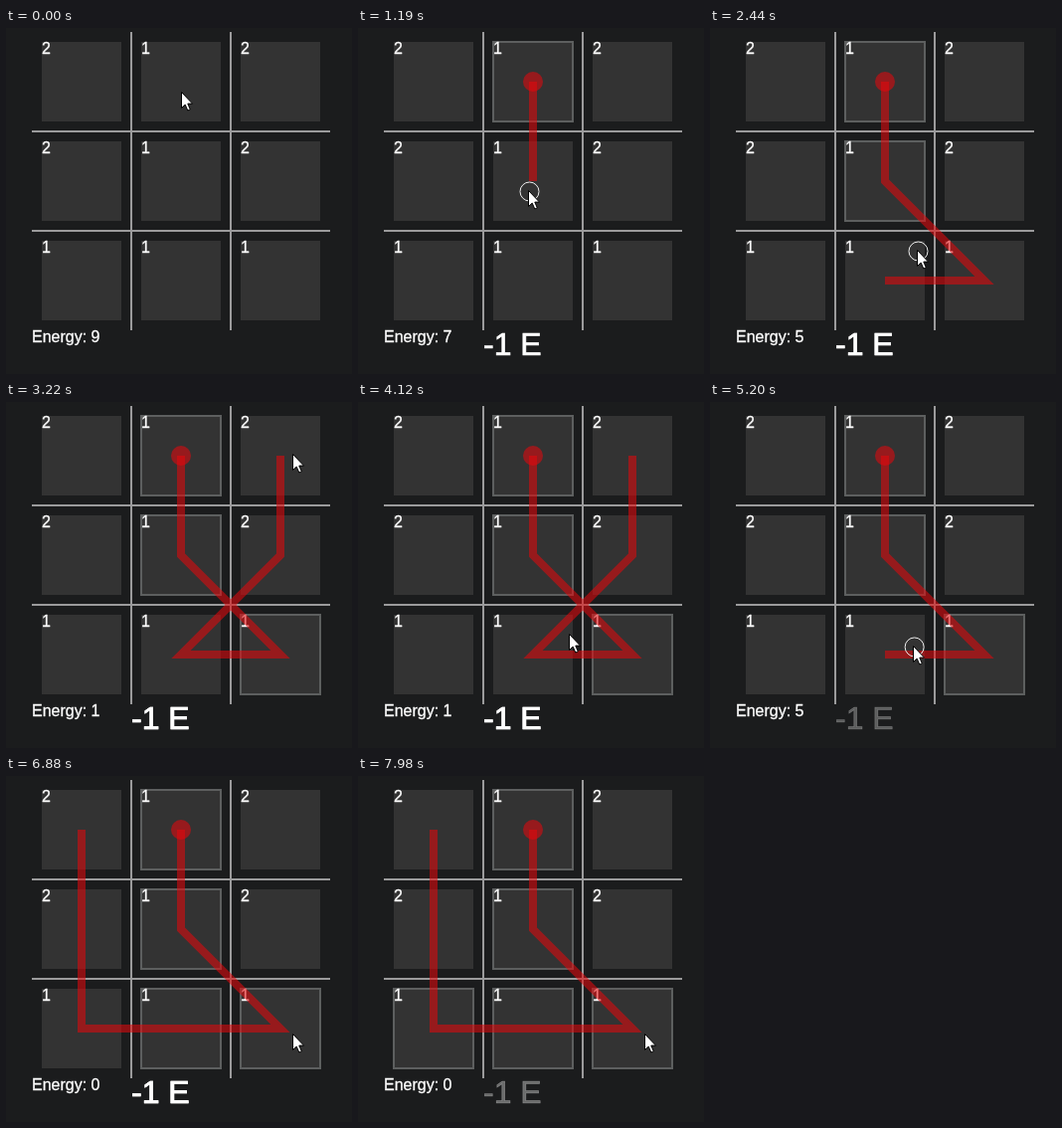
Write an HTML page with a canvas that moves like this. It is 348x348 px and loops after 8000 ms.

```html
<!DOCTYPE html>
<html lang="en">
<head>
<meta charset="utf-8">
<title>Energy path</title>
<style>
  html, body { margin: 0; width: 100%; height: 100%; overflow: hidden; background: #1b1c1d; }
  canvas { display: block; }
</style>
</head>
<body>
<canvas id="stage" width="348" height="348"></canvas>
<script>
const ctx = document.getElementById('stage').getContext('2d');
const LOOP = 8000;
const START_ENERGY = 9;
const STEP = 100;
const BOARD = { x: 26, y: 4, size: 3 * STEP };
const FONT = '"Liberation Sans", Arial, sans-serif';

const TURN = 1024;            // time the walker needs per cell
const FIRST_TURN = 910;
const RIPPLE_TIME = 150;
const CLICK_PAUSE = 300;      // a popup needs this much quiet after its click
const MS_PER_PIXEL = 2.4;     // pointer speed
const POPUP = { fadeIn: 300, fadeOutAt: 1580, fadeOut: 800 };

// Pointer stops; all but the idle ones are clicks.
const stop = (time, x, y, idle = false) => ({ time, x, y, idle });
const STOPS = [
  stop(470, 177, 65), stop(1150, 172, 164), stop(2140, 286, 250), stop(2400, 209, 224),
  stop(3050, 289, 53), stop(4100, 213, 234, true), stop(5150, 206, 246),
  stop(5550, 54, 240), stop(5880, 90, 82), stop(6870, 289, 260, true)
];

const clamp = v => Math.max(0, Math.min(1, v));
const center = ({ col, row }) => [76 + STEP * col, 54 + STEP * row];
const corner = ({ col, row }) => [36 + STEP * col, 14 + STEP * row];
const cost = ({ col, row }) => row < 2 && col !== 1 ? 2 : 1;
const cellAt = ({ x, y }) => ({
  col: Math.floor((x - BOARD.x) / STEP),
  row: Math.floor((y - BOARD.y) / STEP)
});
const sameCell = (a, b) => a.col === b.col && a.row === b.row;
const CELLS = Array.from({ length: 9 }, (_, i) => ({ col: i % 3, row: Math.floor(i / 3) }));

// A visited cell cuts the path back; a new one is reached king-wise.
function extend(path, target) {
  const visited = path.findIndex(cell => sameCell(cell, target));
  if (visited >= 0) return path.slice(0, visited + 1);
  if (!path.length) return [target];
  const { col, row } = path[path.length - 1];
  const next = {
    col: col + Math.sign(target.col - col),
    row: row + Math.sign(target.row - row)
  };
  const longer = [...path, next];
  return sameCell(next, target) ? longer : extend(longer, target);
}

let route = [];
const clicks = STOPS.filter(s => !s.idle).map(({ time, x, y }, i, all) => {
  const before = route.length;
  route = extend(route, cellAt({ x, y }));
  const quiet = i + 1 === all.length || all[i + 1].time - time > CLICK_PAUSE;
  return { time, path: route, popup: quiet && route.length > before };
});

// The detour after the third cell costs two turns.
const outlineTime = index => FIRST_TURN + TURN * (index + (index > 2 ? 2 : 0));

function pathAt(time) {
  const last = clicks.filter(click => click.time <= time).pop();
  return last ? last.path : [];
}

function pointerAt(time) {
  const next = STOPS.findIndex(s => s.time > time);
  if (next < 0) return STOPS[STOPS.length - 1];
  if (next === 0) return STOPS[0];
  const from = STOPS[next - 1], to = STOPS[next];
  const travel = Math.min(to.time - from.time,
    MS_PER_PIXEL * Math.hypot(to.x - from.x, to.y - from.y));
  const p = clamp(1 - (to.time - time) / travel);
  const eased = p * p * (3 - 2 * p);
  return { x: from.x + (to.x - from.x) * eased, y: from.y + (to.y - from.y) * eased };
}

function text(str, x, y, size) {
  ctx.font = `${size}px ${FONT}`;
  ctx.fillStyle = ctx.strokeStyle = '#fff';
  ctx.lineWidth = size / 50;
  ctx.fillText(str, x, y);
  ctx.strokeText(str, x, y);
}

function drawBoard(time) {
  ctx.fillStyle = '#1b1c1d';
  ctx.fillRect(0, 0, 348, 348);

  ctx.fillStyle = '#9b9b9c';
  for (const offset of [STEP, 2 * STEP]) {
    ctx.fillRect(BOARD.x + offset - 1, BOARD.y, 2, BOARD.size);
    ctx.fillRect(BOARD.x, BOARD.y + offset - 1, BOARD.size, 2);
  }

  ctx.fillStyle = '#333';
  for (const cell of CELLS) ctx.fillRect(...corner(cell), 80, 80);

  ctx.strokeStyle = '#5d5f5f';
  ctx.lineWidth = 2;
  route.forEach((cell, index) => {
    if (time >= outlineTime(index)) ctx.strokeRect(...corner(cell), 80, 80);
  });

  for (const cell of CELLS) {
    const [x, y] = corner(cell);
    text(cost(cell), x, y + 12, 16);
  }
}

function drawPath(path) {
  if (!path.length) return;
  ctx.fillStyle = ctx.strokeStyle = 'rgba(230, 8, 12, 0.56)';
  ctx.beginPath();
  ctx.arc(...center(path[0]), 10, 0, 2 * Math.PI);
  ctx.fill();

  ctx.lineWidth = 8;
  ctx.beginPath();
  path.forEach(cell => ctx.lineTo(...center(cell)));
  ctx.stroke();
}

function drawPopups(time) {
  for (const click of clicks) {
    const age = time - click.time;
    if (!click.popup || age < 0) continue;
    ctx.globalAlpha = Math.min(
      clamp(age / POPUP.fadeIn),
      clamp(1 - (age - POPUP.fadeOutAt) / POPUP.fadeOut));
    text('-1 E', 126, 329, 32);
  }
  ctx.globalAlpha = 1;
}

function drawPointer(time) {
  const { x, y } = pointerAt(time);
  if (clicks.some(click => time >= click.time && time < click.time + RIPPLE_TIME)) {
    ctx.strokeStyle = '#eee';
    ctx.lineWidth = 1;
    ctx.beginPath();
    ctx.arc(x + 0.5, y + 0.5, 9.5, 0, 2 * Math.PI);
    ctx.stroke();
  }

  ctx.save();
  ctx.translate(Math.round(x) - 0.5, Math.round(y) - 0.5);
  const arrow = new Path2D('M0 0V16L3.7 12.6 6.3 18.5 8.8 17.4 6.3 11.6H11Z');
  ctx.fillStyle = '#fff';
  ctx.fill(arrow);
  ctx.strokeStyle = '#000';
  ctx.lineWidth = 1;
  ctx.stroke(arrow);
  ctx.restore();
}

function render(time) {
  const path = pathAt(time);
  const energy = path.reduce((left, cell) => left - cost(cell), START_ENERGY);
  drawBoard(time);
  drawPath(path);
  text(`Energy: ${energy}`, 26, 316, 16);
  drawPopups(time);
  drawPointer(time);
}

const startTime = performance.now();
function tick() {
  render((performance.now() - startTime) % LOOP);
  requestAnimationFrame(tick);
}
tick();
</script>
</body>
</html>
```
